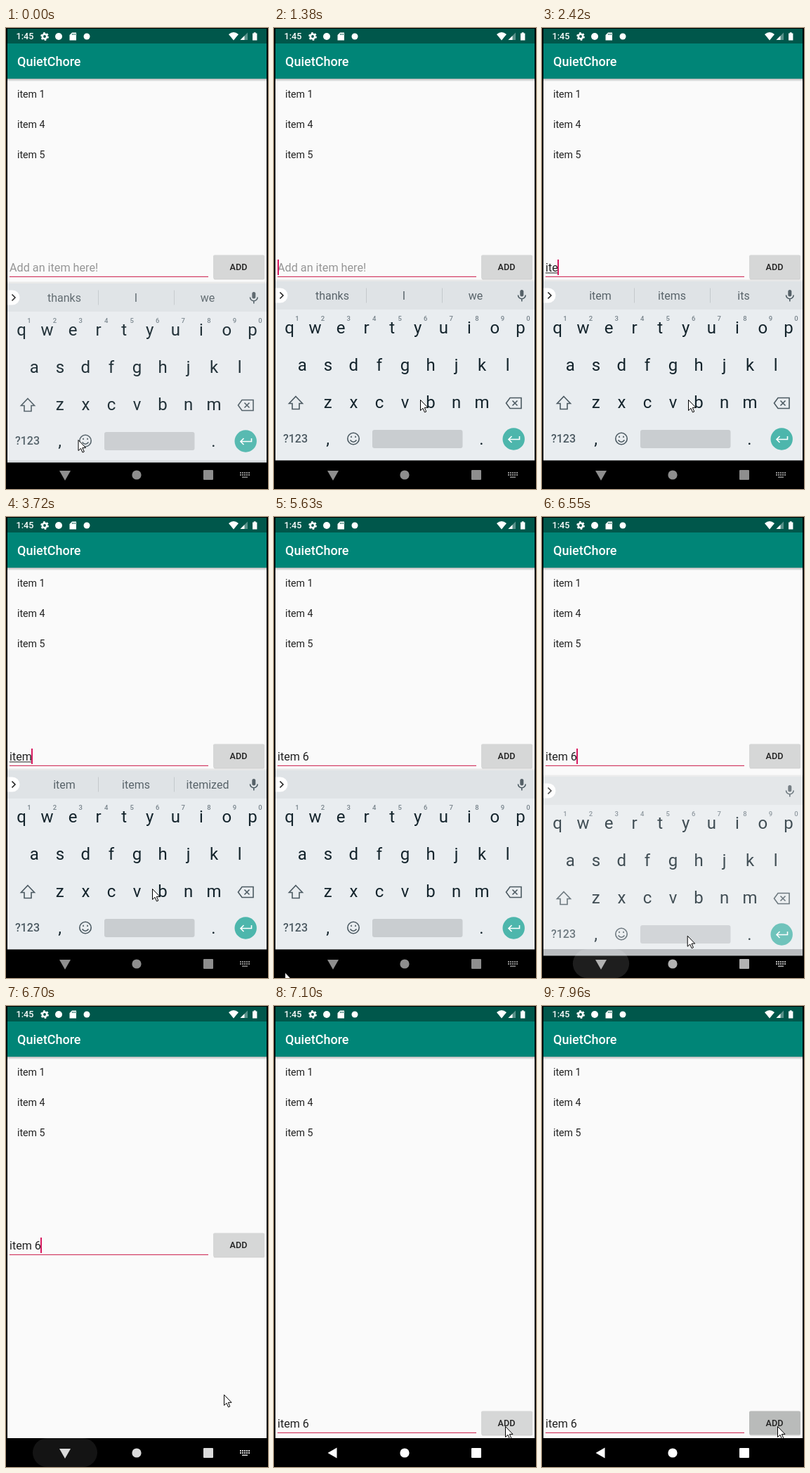
Animation of 373x655 px, one loop 8 s. Source, as an HTML page:

```html
<!DOCTYPE html>
<html lang="en">
<head>
<meta charset="utf-8">
<title>To-do list</title>
<style>
html, body { margin: 0; width: 100%; height: 100%; overflow: hidden; background: #000; }
svg { display: block; width: 373px; height: 655px; font-family: Roboto, sans-serif; }
text { white-space: pre; }
.mid { text-anchor: middle; }
.bold { font-weight: 500; }
.line { fill: none; stroke: #4c5a62; stroke-width: 1.6; }
</style>
</head>
<body>
<svg viewBox="0 0 373 655">
  <defs>
    <linearGradient id="shade" x2="0" y2="1">
      <stop stop-color="#000" stop-opacity=".28"/><stop offset="1" stop-color="#000" stop-opacity="0"/>
    </linearGradient>
  </defs>
  <rect width="373" height="655"/>
  <rect x="2" y="1" width="369" height="613" fill="#fafafa"/>
  <rect x="2" y="1" width="369" height="21" fill="#00574b"/>
  <rect x="2" y="22" width="369" height="50" fill="#008577"/>
  <rect x="2" y="72" width="369" height="4" fill="url(#shade)"/>

  <!-- status bar -->
  <g fill="#fff">
    <text x="14.5" y="16.3" font-size="12.6" class="bold">1:45</text>
    <circle cx="55" cy="12" r="3.2" fill="none" stroke="#fff" stroke-width="2.6"/>
    <circle cx="55" cy="12" r="5" fill="none" stroke="#fff" stroke-width="1.8" stroke-dasharray="2.6 2.636"/>
    <circle cx="75" cy="12" r="5"/>
    <path d="M94 6.5h6v11h-9.500V10z"/>
    <path d="M94.5 8v2m2-2v2m2-2v2" stroke="#00574b" stroke-width=".9"/>
    <circle cx="115" cy="12" r="4.5"/>
    <path d="M317 9q7-6 14 0l-7 8.500z"/>
    <path d="M344 6.500V17h-10.500z" opacity=".35"/>
    <path d="M339.500 11v6h-6z"/>
    <path d="M351 7.500h1.800V6.200h2.800v1.300h1.800v10H351z"/>
  </g>
  <text x="16" y="54" font-size="18" class="bold" fill="#fff">QuietChore</text>
  <g id="items" font-size="14.2" fill="#212121"></g>

  <!-- entry row -->
  <g id="entry">
    <rect x="295.5" y="324" width="72.5" height="33.5" rx="2" opacity=".16"/>
    <rect id="button" x="295" y="322.5" width="73" height="33.5" rx="2"/>
    <text x="331" y="343.8" font-size="12.6" class="mid bold" fill="#212121">ADD</text>
    <rect x="5" y="352.8" width="283" height="1.2" fill="#d23a62"/>
    <text id="hint" x="5" y="346" font-size="16.2" fill="#969696">Add an item here!</text>
    <text id="typed" x="5" y="346" font-size="16.1" fill="#212121"></text>
    <rect id="compose" x="5" y="347.5" height="1" fill="#212121"/>
    <rect id="caret" y="329" width="2" height="22" fill="#d81b60"/>
  </g>

  <!-- keyboard -->
  <g id="keyboard">
    <rect x="2" y="357.5" width="369" height="2.5" opacity=".07"/>
    <rect x="2" y="614" width="369" height="41"/>
    <rect x="2" y="400" width="369" height="214.4" fill="#e9edf0"/>
    <rect x="2" y="360" width="369" height="40" fill="#dfe3e6"/>
    <path d="M2 369.500h7a10.500 10.500 0 0 1 0 21h-7z" fill="#fff"/>
    <path d="M8.500 375.500l4.500 4.500-4.500 4.500" class="line" style="stroke:#222"/>
    <path id="dividers" d="M131.500 369.500v21m108-21v21" stroke="#c4c9cc"/>
    <g id="words" font-size="16" fill="#59646a" class="mid"></g>
    <rect x="350.3" y="372" width="5" height="9.5" rx="2.5" fill="#566168"/>
    <path d="M347.500 379.500a5.300 5.300 0 0 0 10.600 0M352.800 385v3.500" class="line"/>
    <g id="keys" font-size="24" fill="#14242c" class="mid"></g>
    <g id="digits" font-size="9.5" fill="#76828a" class="mid bold"></g>
    <path d="M31 523.500l9.500 10H36v8H26v-8h-4.500z" class="line"/>
    <path d="M336 525.500h16v15H336l-5.500-7.500zm3.500 4l7 7m0-7l-7 7" class="line"/>
    <text x="30.5" y="589.3" font-size="16" class="mid bold" fill="#4c5a62">?123</text>
    <circle cx="113" cy="583.5" r="8.2" class="line"/>
    <path d="M108.500 585.500q4.500 5.500 9 0M110 579.800v2.200m6-2.200v2.200" class="line"/>
    <rect x="140" y="571" width="128.5" height="26" rx="3" fill="#c9cdd0"/>
    <circle cx="341.2" cy="584" r="15.7" fill="#4db6ac"/>
    <path d="M349.500 580v4.500H334m4.500-4.500l-4.500 4.500 4.500 4.500" class="line" style="stroke:#fff"/>
  </g>

  <!-- navigation bar -->
  <rect id="ripple" y="614" height="41" rx="20.5" fill="#fff"/>
  <g id="nav">
    <path id="back"/>
    <circle cx="186" cy="635" r="6.6"/>
    <rect x="281" y="628" width="14" height="14" rx="1"/>
    <path id="switcher" d="M333 631h2v2h-2zm3 0h2v2h-2zm3 0h2v2h-2zm3 0h2v2h-2zm3 0h2v2h-2zM333 634h2v2h-2zm3 0h2v2h-2zm3 0h2v2h-2zm3 0h2v2h-2zm3 0h2v2h-2zM336 637.500h8v1.500h-8z"/>
  </g>
  <path id="mouse" d="M.5 .5v15L4 12.300 6.500 18l2.300-1-2.500-5.600H11z" fill="#fff" stroke="#000"/>
</svg>
<script>
const LOOP = 8000, ENTRY = 'item 6';
const KEY_TIMES = [1830, 2270, 2420, 2700, 3870, 4180];
const FOCUS = 465, BLINK = 538, BLINK_LEAD = 165;
const DISMISS = 6420, HIDDEN = 6700, RESIZED = 6830, PRESSED = 7960;

const SUGGESTIONS = {
  '': ['thanks', 'I', 'we'],
  i: ['i', 'I', 'in'],
  it: ['it', 'It', 'is'],
  ite: ['item', 'items', 'its'],
  item: ['item', 'items', 'itemized'],
};

// Pointer waypoints: time, x, y
const POINTER = [
  [120, 102.500, 585], [510, 208, 528], [5199, 208, 528], [5200, 15, 660], [5600, 15, 660],
  [5630, 15, 646.500], [6140, 86, 631], [DISMISS, 86, 631], [6550, 206, 595],
  [HIDDEN, 310, 552], [RESIZED, 317, 541], [7100, 329, 597], [7500, 335, 597],
];

const $ = id => document.getElementById(id);
const set = (id, attrs) => {
  for (const name in attrs) $(id).setAttribute(name, attrs[name]);
};
const addText = (parent, x, y, content = '') => {
  const node = document.createElementNS('http://www.w3.org/2000/svg', 'text');
  node.setAttribute('x', x);
  node.setAttribute('y', y);
  node.textContent = content;
  return $(parent).appendChild(node);
};
const progress = (t, start, end) => Math.min(1, Math.max(0, (t - start) / (end - start)));
const mix = (a, b, p) => a + (b - a) * p;

[1, 4, 5].forEach((n, i) => addText('items', 16, 99.3 + i * 43, `item ${n}`));

const PITCH = 36.55;
['qwertyuiop', 'asdfghjkl', 'zxcvbnm'].forEach((row, r) =>
  [...row].forEach((key, i) => addText('keys', 22 + (i + r * (r + 1) / 4) * PITCH, 433.8 + r * 53, key)));
addText('keys', 76.5, 592, ',');
addText('keys', 295.5, 592, '.');
for (let i = 0; i < 10; i++) addText('digits', 33 + i * PITCH, 416.3, (i + 1) % 10);
const words = [83, 185, 287].map(x => addText('words', x, 386));

function pointerAt(t) {
  const next = POINTER.findIndex(point => point[0] > t);
  if (next === 0) return POINTER[0].slice(1);
  if (next < 0) return POINTER.at(-1).slice(1);
  const [t0, x0, y0] = POINTER[next - 1], [t1, x1, y1] = POINTER[next];
  const p = progress(t, t0, t1);
  return [mix(x0, x1, p), mix(y0, y1, p)];
}

function drawEntry(t) {
  const pressed = KEY_TIMES.filter(time => time <= t);
  const typed = ENTRY.slice(0, pressed.length);
  const composing = typed in SUGGESTIONS;
  $('typed').textContent = typed;
  const width = typed ? $('typed').getComputedTextLength() : 0;
  set('hint', { opacity: typed ? 0 : 1 });
  set('compose', { width: composing ? Math.max(0, width - .5) : 0 });

  // Every key press restarts the caret's blinking.
  const blinkStart = (pressed.at(-1) ?? FOCUS) - BLINK_LEAD;
  const caretOn = Math.floor((t - blinkStart) / BLINK) % 2 === 0;
  set('caret', { x: Math.floor(5 + width), opacity: caretOn ? 1 : 0 });

  words.forEach((node, i) => node.textContent = composing ? SUGGESTIONS[typed][i] : '');
  set('dividers', { opacity: typed === ENTRY ? 0 : 1 });
  set('entry', { transform: `translate(0 ${t < RESIZED ? 0 : 253})` });
  set('button', { fill: t < PRESSED ? '#d6d7d7' : '#b9bbba' });
}

function drawKeyboard(t) {
  const away = t < 120 ? 1 / 3 : progress(t, DISMISS - 20, 6550);
  set('keyboard', {
    transform: `translate(0 ${9 * away})`,
    opacity: t < HIDDEN ? 1 - .2 * away : 0,
  });
}

function drawNavigation(t) {
  const spread = progress(t, DISMISS, HIDDEN);
  const width = mix(70, 92, spread);
  const rippling = t >= DISMISS && t < RESIZED;
  set('ripple', { x: 84 - width / 2, width, opacity: rippling ? mix(.15, .08, spread) : 0 });

  const level = mix(142, 255, progress(t, DISMISS, RESIZED));
  set('nav', { fill: `rgb(${level} ${level} ${level})` });
  set('back', { d: t < RESIZED ? 'M76 629h16l-8 14z' : 'M76.5 635l13-7.5v15z' });
  set('switcher', { opacity: t < RESIZED ? 1 : 0 });
}

function tick() {
  const t = performance.now() % LOOP;
  drawEntry(t);
  drawKeyboard(t);
  drawNavigation(t);
  set('mouse', { transform: `translate(${pointerAt(t)})` });
  requestAnimationFrame(tick);
}
tick();
</script>
</body>
</html>
```
